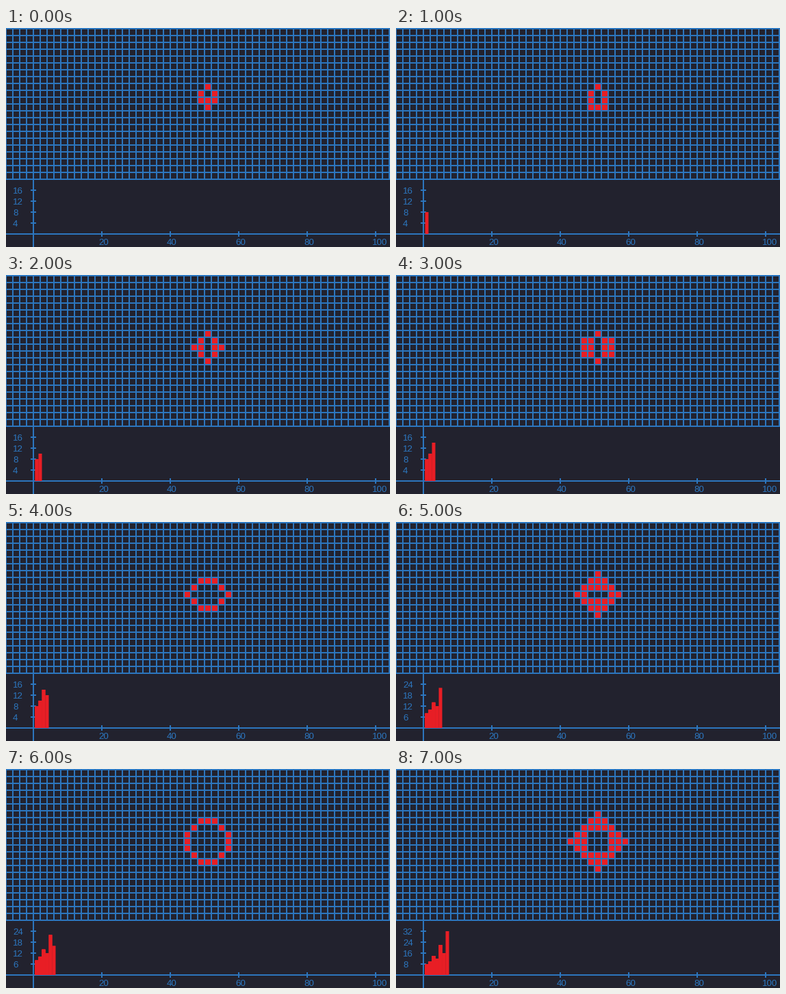
These frames come from a looping animation (561x320 px, 8000 ms). A matplotlib script:

```python
import math

import matplotlib.pyplot as plt
import numpy as np
from matplotlib.animation import FuncAnimation
from matplotlib.patches import Rectangle

W, H, DPI = 561, 320, 64
COLS, ROWS, CELL = 56, 22, 10
AXIS_X, AXIS_Y = 40, 301
STEPS = 8
BG, BLUE, RED = "#22222e", "#2c76be", "#e81e25"
SEED = [(29, 8), (28, 9), (30, 9), (28, 10), (29, 10), (30, 10), (29, 11)]


def evolve(board):
    """One generation of Conway's Game of Life."""
    near = sum(np.roll(board, (dy, dx), (0, 1))
               for dy in (-1, 0, 1) for dx in (-1, 0, 1) if dx or dy)
    return ((near == 3) | ((near == 2) & (board == 1))).astype(int)


boards = [np.zeros((ROWS, COLS), int)]
for col, row in SEED:
    boards[0][row, col] = 1
while len(boards) < STEPS:
    boards.append(evolve(boards[-1]))
counts = [int(b.sum()) for b in boards]

fig = plt.figure(figsize=(W / DPI, H / DPI), dpi=DPI, facecolor=BG)
ax = fig.add_axes([0, 0, 1, 1])
ax.set_xlim(0, W)
ax.set_ylim(H, 0)
ax.axis("off")


def rect(x, y, w, h, color, z=1, snap=True):
    return ax.add_patch(Rectangle((x, y), w, h, fc=color, lw=0, zorder=z, snap=snap))


def label(x, y, text):
    return ax.text(x, y, text, color=BLUE, family="Liberation Sans",
                   size=13.33 * 72 / DPI, ha="left", va="baseline")


# Grid
for i in range(COLS + 1):
    rect(i * CELL - 1, 0, 2, ROWS * CELL + 2, BLUE)
for j in range(ROWS + 1):
    rect(0, j * CELL, W, 2, BLUE)

# Chart axes with ticks
rect(AXIS_X - 1, 222, 2, H - 222, BLUE)
rect(0, AXIS_Y - 1, W, 2, BLUE)
for n in range(20, 101, 20):
    x = AXIS_X + 5 * n
    rect(x - 1, AXIS_Y - 4, 2, 8, BLUE)
    label(x - 5, 317, str(n))
y_labels = []
for k in range(1, 5):
    y = AXIS_Y - 16 * k
    rect(AXIS_X - 4, y - 1, 8, 2, BLUE)
    y_labels.append(label(10, y + 5, ""))

live = []


def update(gen):
    while live:
        live.pop().remove()
    for row, col in np.argwhere(boards[gen]):
        live.append(rect(col * CELL + 1, row * CELL + 2, 8, 8, RED, 2))

    unit = max(4, math.ceil(max(counts[:gen + 1]) / 4))
    for k, text in enumerate(y_labels, 1):
        text.set_text(str(k * unit))

    # Bars are painted again on every step, so their soft edges build up
    for last in range(1, gen + 1):
        for g in range(1, last + 1):
            height = counts[g] * 16 / unit
            live.append(rect(AXIS_X + 5 * g - 2.5, AXIS_Y - height, 5, height,
                             RED, 3, False))
    return live + y_labels


anim = FuncAnimation(fig, update, frames=STEPS, interval=1000,
                     init_func=lambda: update(0), repeat=True, repeat_delay=0)
plt.show()
```
